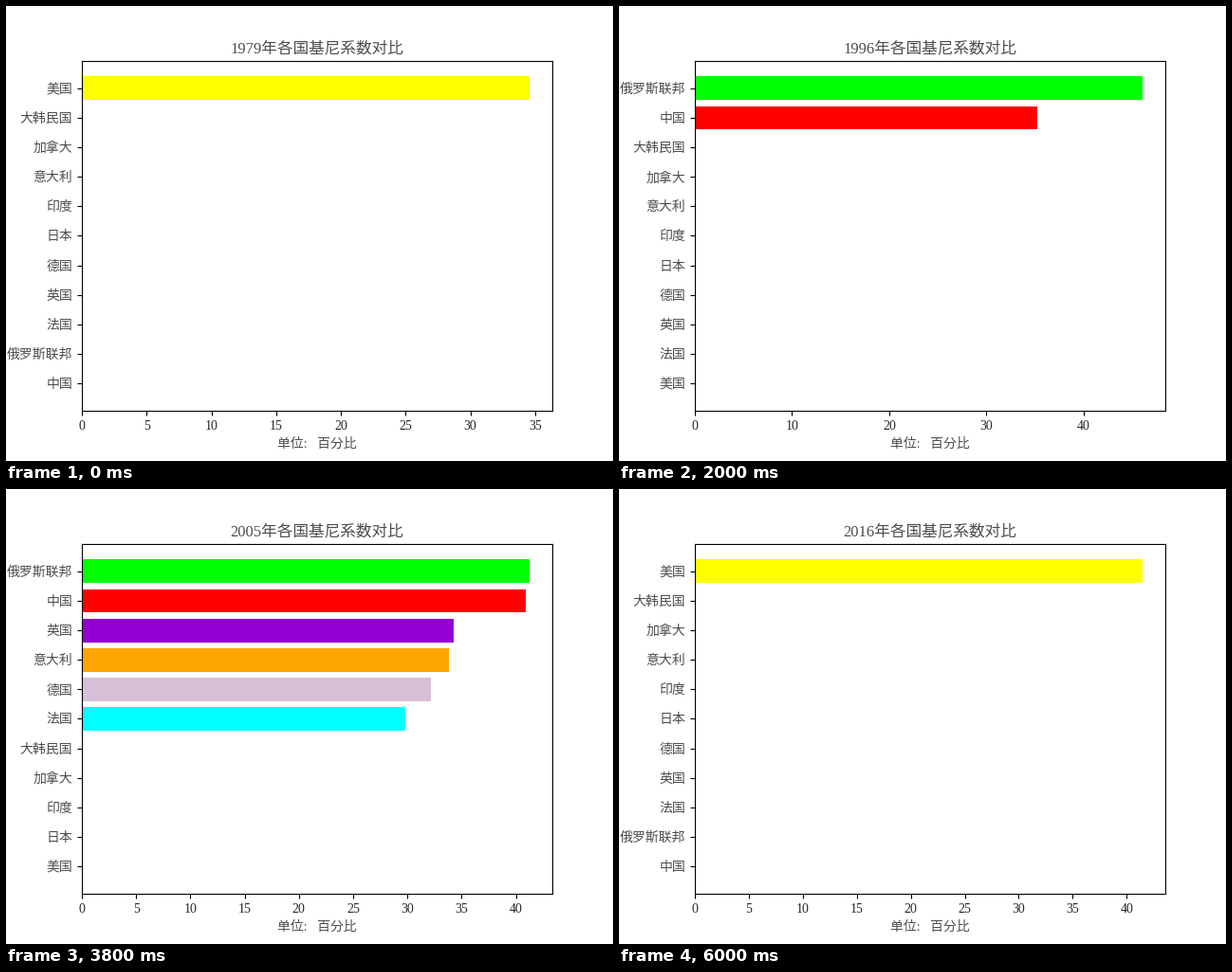
A matplotlib script that plays this animation: 640x480 px, repeating every 6.2 s.

```python
import matplotlib.pyplot as plt
import numpy as np
from matplotlib.animation import FuncAnimation

plt.rcParams.update({
    "font.family": ["Liberation Serif", "Noto Sans CJK JP"],
    "text.color": "0.3",
    "axes.labelcolor": "0.3",
    "ytick.labelcolor": "0.3",
    "xtick.labelcolor": "0.15",
})


def span(first, last, step=1):
    return range(first, last + 1, step)


# name, bar colour, survey years, turning points of the Gini curve
COUNTRIES = [
    ("中国", "red", {1990, *span(1996, 2008, 3), *span(2010, 2015)},
     [(1990, 32.2), (1996, 35.2), (2002, 42), (2005, 40.9), (2012, 42.2),
      (2013, 39.7), (2015, 38.6)]),
    ("美国", "yellow", {1979, 1986, *span(1991, 2000, 3), *span(2004, 2016, 3)},
     [(1979, 34.6), (1991, 38.2), (1997, 40.8), (2010, 40.4), (2016, 41.5)]),
    ("俄罗斯联邦", "lime", {1993, *span(1996, 2015)},
     [(1993, 48.4), (1996, 46.1), (1997, 38.5), (2001, 36.9), (2005, 41.3),
      (2007, 42.3), (2010, 39.5), (2012, 40.7), (2015, 37.7)]),
    ("法国", "cyan", {*span(2003, 2015)},
     [(2003, 31.4), (2005, 29.8), (2008, 33), (2015, 33.1)]),
    ("英国", "darkviolet", {*span(2004, 2015)},
     [(2004, 36), (2005, 34.3), (2010, 34.4), (2012, 32.3), (2015, 33.2)]),
    ("德国", "thistle",
     {*span(1991, 1994, 3), 1995, 1998, *span(2000, 2011), 2013, 2015},
     [(1991, 29.2), (1998, 28.3), (2001, 30.3), (2004, 30.4), (2005, 32.2),
      (2010, 30.2), (2015, 31.7)]),
    ("日本", "pink", {2008}, [(2008, 32.1)]),
    ("印度", "blue", {1983, 1987, 1993, 2004, 2009, 2011},
     [(1983, 31.1), (2011, 35.7)]),
    ("意大利", "orange", {2000, *span(2003, 2015)},
     [(2000, 35.3), (2005, 33.8), (2007, 32.9), (2012, 35.2)]),
    ("加拿大", "tan",
     {1981, 1987, 1998, *span(1991, 2000, 3), *span(2004, 2013, 3)},
     [(1981, 32.4), (1991, 31), (2000, 33.3), (2013, 34)]),
    ("大韩民国", "coral", {*span(2006, 2012, 2)}, [(2006, 32), (2012, 31.6)]),
]

YEARS = sorted(set().union(*(surveys for _, _, surveys, _ in COUNTRIES)))

fig, ax = plt.subplots(figsize=(6.4, 4.8), dpi=100)


def gini(year, surveys, points):
    return np.interp(year, *zip(*points)) if year in surveys else 0


def draw(i):
    year = YEARS[i]
    rows = [(gini(year, surveys, points), name, color)
            for name, color, surveys, points in COUNTRIES]
    rows.sort(key=lambda row: row[0])
    values, names, colors = zip(*rows)
    ax.clear()
    ax.barh(names, values, color=colors)
    ax.set_title(f"{year}年各国基尼系数对比")
    ax.set_xlabel("单位:   百分比")


anim = FuncAnimation(fig, draw, frames=len(YEARS), init_func=lambda: draw(0),
                     interval=200, repeat=True, repeat_delay=0)
plt.show()
```
